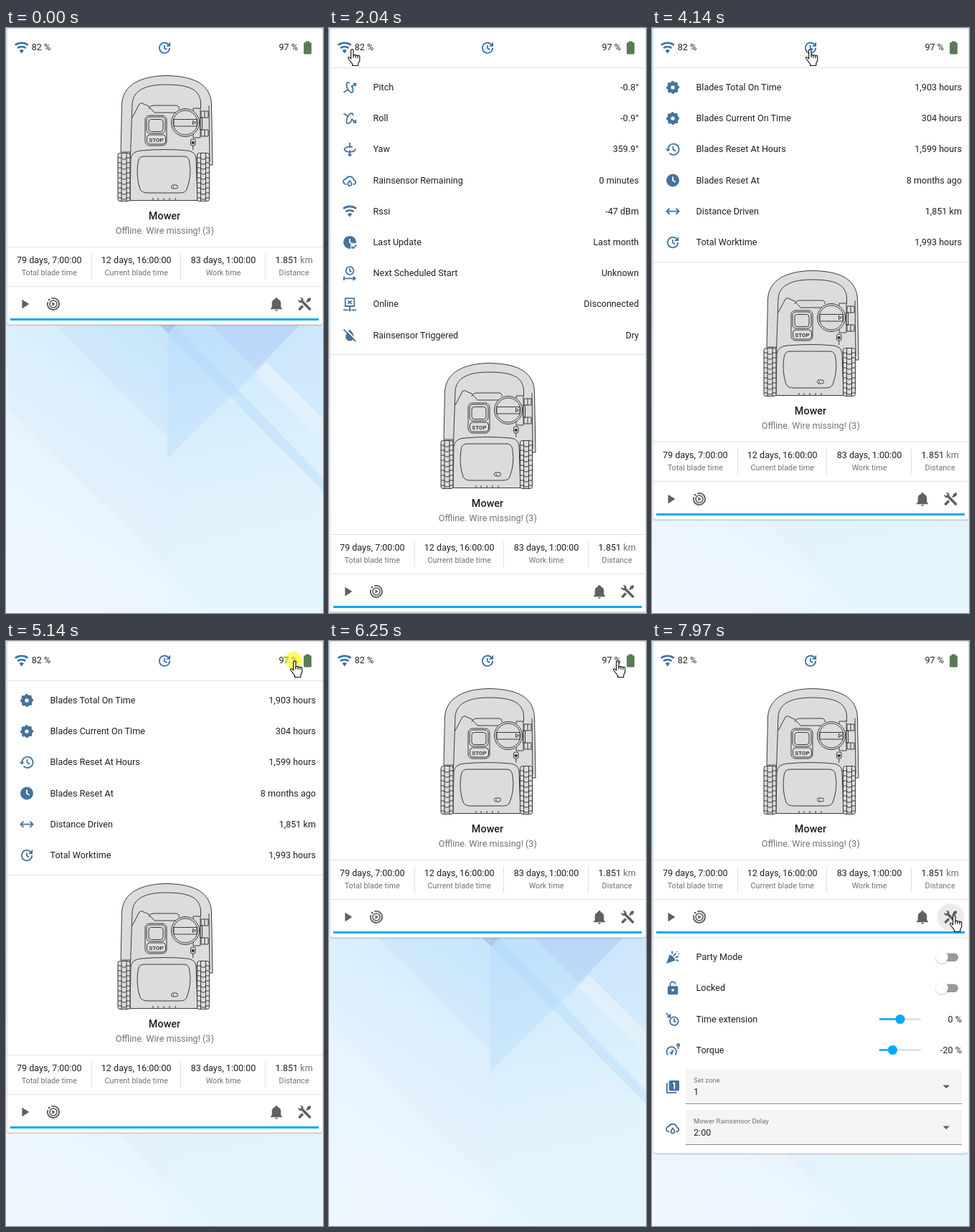
An HTML page that plays this animation: 442x816 px, repeating every 8 s.

```html
<!DOCTYPE html>
<html lang="en">
<head>
<meta charset="utf-8">
<title>Mower card</title>
<style>
html, body { margin: 0; width: 100%; height: 100%; overflow: hidden; background: #e6f3fc; }
svg { display: block; width: 100vw; height: 100vh; }
text { font: 12.6px Roboto, sans-serif; fill: #212121; }
.mid { text-anchor: middle; }
.end { text-anchor: end; }
.name { font-size: 14.4px; font-weight: 500; }
.grey { fill: #727272; }
.label { font-size: 10.8px; fill: #727272; }
.float { font-size: 9.55px; fill: #727272; }
.line { stroke: #e0e0e0; }
.icon { fill: none; stroke: currentColor; stroke-width: 2; }
.icon .f { fill: currentColor; stroke: none; }
.icon .w { stroke: #fff; }
.mower { fill: #dcdcdd; stroke: #3a3a3a; stroke-linejoin: round; }
.mower .n { fill: none; }
.mower text { font-size: 8px; font-weight: 700; fill: #444; stroke: none; text-anchor: middle; }
</style>
</head>
<body>
<svg viewBox="0 0 442 816" id="stage"></svg>
<script>
const LOOP = 8000, ROW = 43.2;
const BLUE = '#44739e', HEAD = '#3a70ac', GREY = '#606060', ACCENT = '#03a9f4';

// Icons on a 24 unit grid; strokes by default, class f for solid parts.
const filled = d => `<path class="f" d="${d}"/>`;
const line = d => `<path d="${d}"/>`;
const cloud = line('M7 18H6a4 4 0 0 1 0-8 6.500 6.500 0 0 1 12.300 1.500 3.300 3.300 0 0 1 .2 6.500H17') +
  line('M12 12.500q2.800 3.500 2.800 5.200a2.800 2.800 0 0 1-5.600 0q0-1.700 2.800-5.200z');
const clock = '<circle class="f" cx="12" cy="12" r="10"/><path class="w" d="M12 6.500V12l4 2.800"/>';
const blade = Array.from({ length: 8 }, (_, i) =>
  `<path class="f" transform="rotate(${i * 45} 12 12)" d="M8 5l3-3.500q3 .5 4.500 4z"/>`).join('') +
  '<circle cx="12" cy="12" r="5.500" stroke-width="5"/>';
const orbit = (tilt, axis) => `<ellipse cx="12" cy="12" rx="4" ry="8.500" transform="rotate(${tilt} 12 12)" stroke-dasharray="34 5"/>` + line(axis);
const icons = {
  wifi: filled('M12 21l3.600-4.800a6 6 0 0 0-7.200 0zM12 3A18 18 0 0 0 1.200 6.600L3 9a15 15 0 0 1 18 0l1.800-2.400A18 18 0 0 0 12 3zM12 9a12 12 0 0 0-7.200 2.400l1.800 2.400a9 9 0 0 1 10.800 0l1.800-2.400A12 12 0 0 0 12 9z'),
  update: line('M20 12.100A8 8 0 1 1 17.600 6.500M11.800 8v4.600l3.900 2.300') + filled('M21 3v7.100h-6.800z'),
  battery: filled('M16.700 4H15V2H9v2H7.300Q6 4 6 5.300v15.400Q6 22 7.300 22h9.400q1.300 0 1.300-1.300V5.300Q18 4 16.700 4z'),
  play: filled('M8 5.100v14l11-7z'),
  motion: line('M8.900 3.500A9 9 0 1 1 3.500 8.900') + '<circle cx="12" cy="12" r="5.600" stroke-width="1.800"/>' +
    filled('M10.300 8.800v6.400l4.500-3.200z') + '<circle class="f" cx="5.500" cy="5.500" r="1.500"/>',
  bell: filled('M21 19v1H3v-1l2-2v-6a7 7 0 0 1 5-6.700V4a2 2 0 0 1 4 0v.3a7 7 0 0 1 5 6.700v6zM14 21a2 2 0 0 1-4 0z'),
  tools: filled('M21.700 20.300l-1.400 1.400a1 1 0 0 1-1.400 0L7 9.850A4 4 0 0 1 2.200 4.700l2.560 2.540 2.480-2.480L4.700 2.200A4 4 0 0 1 9.850 7L21.700 18.900a1 1 0 0 1 0 1.400z') +
    filled('M2.300 18.900a1 1 0 0 0 0 1.400l1.400 1.400a1 1 0 0 0 1.400 0l5.500-5.450-2.840-2.830zM20 2l-4 2v2l-2.170 2.170 2 2L18 8h2l2-4z'),
  pitch: orbit(-25, 'M2.500 19.500L9 15.500M14 11l7-4.500M17.500 6l4 .5-1.500 4'),
  roll: orbit(25, 'M2.500 4.500L9 8.500M14 13l7 5M17 18.500l4.500-.3-1-4'),
  yaw: '<ellipse cx="12" cy="12" rx="8.500" ry="4" stroke-dasharray="34 5"/>' + line('M12 1.500v8M12 13v9M9.500 19.500L12 22l2.500-2.500'),
  cloud,
  clock,
  clockCheck: clock + '<circle cx="18.500" cy="18.500" r="5.500" fill="#fff" stroke="none"/>' + line('M14.500 18.500l2.700 2.700 5-5'),
  clockStart: '<circle cx="12" cy="8" r="6"/>' + line('M12 4.500V8l2.500 2M3 17v6M3 20h17M17 17l3.500 3-3.500 3'),
  offline: line('M5 3h14v12H5zM9 6.500l6 5M15 6.500l-6 5M12 15v5M2 21h7M15 21h7') + '<circle class="f" cx="12" cy="21" r="2"/>',
  waterOff: filled('M12 3q6.500 7 6.500 11.500a6.500 6.500 0 0 1-13 0Q5.500 10 12 3z') +
    '<path class="w" d="M5 2.500L22 19.500"/>' + line('M2.500 3L21 21.500'),
  blade,
  history: line('M4.500 12A8.500 8.500 0 1 1 7 18M12.500 7v5.200l4 2.400') + filled('M.8 11.500h7.400L4.500 15.500z'),
  distance: line('M3 12h18M7 7.500L2.500 12 7 16.500M17 7.500l4.500 4.500-4.500 4.500'),
  heat: line('M10 4.500a2 2 0 0 1 4 0v9a4.300 4.300 0 1 1-4 0z') + '<circle class="f" cx="12" cy="17.500" r="2.300"/>',
  flash: filled('M7 2v11h3v9l7-12h-4l4-8z'),
  party: filled('M2 22l5-14q7 2 9 9z') + line('M13 10l4-4M16 12l5-1M11 7V2.500M17 16l4 2M18 3l1 1M20.500 6.500l1 1'),
  unlock: filled('M6 8.500h12q2 0 2 2V20q0 2-2 2H6q-2 0-2-2v-9.500q0-2 2-2z') +
    line('M8 9V6a4 4 0 0 1 8 0v.5') + '<circle cx="12" cy="15" r="2" fill="#fff" stroke="none"/>',
  clockIn: '<circle cx="14" cy="15" r="6.500"/>' + line('M14 11v4.200l3 1.500M1.500 2.500l6 6M7.800 4v4.800H3'),
  torque: line('M4.500 19.500a7.500 7.500 0 1 1 11 0M10 16l3.500-4M20.500 10V6') +
    '<circle class="f" cx="10" cy="16.500" r="2.200"/><circle cx="20.500" cy="4" r="1.800"/><path d="M6 15h1M10 11.500v1"/>',
  zone: filled('M8 2h12q2 0 2 2v12q0 2-2 2H8q-2 0-2-2V4q0-2 2-2z') + '<path class="w" d="M12 6h2.500v9"/>' + line('M3 6v15h15')
};
const icon = (name, x, y, color = BLUE) =>
  `<g class="icon" color="${color}" transform="translate(${x - 10.8} ${y - 10.8}) scale(.9)">${icons[name]}</g>`;
const text = (s, x, y, cls = '') => `<text x="${x}" y="${y}" class="${cls}">${s}</text>`;
const rule = y => `<path class="line" d="M2 ${y}H441"/>`;
const row = (y, [name, label, value]) =>
  icon(name, 29, y + .5) + text(label, 61.5, y + 4.5) + (value ? text(value, 432, y + 4.5, 'end') : '');

const panels = {
  info: [
    ['pitch', 'Pitch', '-0.8°'], ['roll', 'Roll', '-0.9°'], ['yaw', 'Yaw', '359.9°'],
    ['cloud', 'Rainsensor Remaining', '0 minutes'], ['wifi', 'Rssi', '-47 dBm'],
    ['clockCheck', 'Last Update', 'Last month'], ['clockStart', 'Next Scheduled Start', 'Unknown'],
    ['offline', 'Online', 'Disconnected'], ['waterOff', 'Rainsensor Triggered', 'Dry']],
  blades: [
    ['blade', 'Blades Total On Time', '1,903 hours'], ['blade', 'Blades Current On Time', '304 hours'],
    ['history', 'Blades Reset At Hours', '1,599 hours'], ['clock', 'Blades Reset At', '8 months ago'],
    ['distance', 'Distance Driven', '1,851 km'], ['update', 'Total Worktime', '1,993 hours']],
  battery: [
    ['battery', 'Battery', '97 %'], ['heat', 'Battery Temperature', '18.4 °C'],
    ['flash', 'Battery Voltage', '20.08 V'], ['history', 'Battery Total Charge Cycles', '1,123'],
    ['battery', 'Battery Charging', 'Not charging']]
};
const shiftOf = key => panels[key] ? Math.round(panels[key].length * ROW + 12.6) : 0;
const panelMarkup = key => `<g id="${key}">${rule(55.5)}${
  panels[key].map((r, i) => row(82.4 + i * ROW, r)).join('')}${rule(54.5 + shiftOf(key))}</g>`;

function wheel(x) {
  let treads = '';
  for (let y = 181; y < 240; y += 7) treads += `M${x} ${y}h5l1.500 2h4l1.500-2H${x + 17}`;
  return `<rect x="${x}" y="174.500" width="17" height="67" rx="3"/>
    <path class="n" d="${treads}M${x + 5} 175v66M${x + 12} 175v66"/>`;
}
const mower = `<g class="mower">
  <path d="M160 173L161.500 106C163 78 190 67 223 66.500C262 67 285 78 286.500 106L288 191H284L282 182H173V173z"/>
  <path class="n" d="M173.500 178L176 106C177 87 194 79 223 79C254 79 270 85 271.500 104V112M283 108L284 186"/>
  <path class="n" d="M176 125L186 106Q189 103 192 106L199 109L207 118H241M199 113Q200 108 207 108H236Q242 108 241 113"/>
  <path d="M173 240.500L174 182Q176 172 188 171Q223 168 253 171Q264 172 265 182L267 240.500z"/>
  <path class="n" d="M205 240v-3M212 240v-3M220 240v-3M228 240v-3M236 240v-3"/>
  <path d="M192 179H248Q255 179 256 188Q259 207 252 225Q250 230 243 230H197Q190 230 187 225Q181 207 184 188Q185 179 192 179z"/>
  <rect x="230.500" y="219" width="9" height="5" rx="2.500"/><path d="M233.500 221v1.500"/>
  ${wheel(156)}${wheel(266.5)}
  <path d="M261 112H271V153H261zM272 116h10v9h-10zM272 142h10v9h-10zM273.500 125v17h-3v-17z"/>
  <path class="n" d="M277 116v9M277 142v9"/>
  <circle cx="250" cy="132" r="19.500"/><circle cx="250" cy="132" r="17" class="n"/>
  <path d="M234 127.500H266V137H234z"/><path d="M260.500 129.500v5l4-2.500z"/>
  <rect x="257.500" y="155" width="6.500" height="9" rx="2"/><circle cx="260.700" cy="160" r="1.700" fill="#333"/><path d="M260.700 164v6"/>
  <rect x="194" y="122" width="30" height="42" rx="6"/><rect x="196" y="124" width="26" height="23" rx="5"/>
  <rect x="199" y="127.500" width="20" height="17" rx="3.500"/><rect x="196.500" y="149" width="26" height="13" rx="4"/>
  <text x="209.500" y="158.500">STOP</text></g>`;

const stat = (x, value, label) => text(value, x, 328, 'mid') + text(label, x, 345, 'label mid');
const main = `<g id="main">${mower}
  ${text('Mower', 221, 267, 'name mid')}${text('Offline. Wire missing! (3)', 221.3, 287, 'grey mid')}
  ${rule(305.5)}${rule(360.5)}<path class="line" d="M119.500 315v36M243.500 315v36M361.500 315v36"/>
  ${stat(60.3, '79 days, 7:00:00', 'Total blade time')}${stat(181.7, '12 days, 16:00:00', 'Current blade time')}
  ${stat(303, '83 days, 1:00:00', 'Work time')}${stat(401.6, '1.851 <tspan class="grey">km</tspan>', 'Distance')}
  <circle id="ripple" cx="416.500" cy="385" opacity=".08"/>
  ${icon('play', 26, 385, GREY)}${icon('motion', 66, 385, GREY)}${icon('bell', 377, 385, GREY)}${icon('tools', 416.5, 385, GREY)}
  <path fill="${ACCENT}" d="M6 405h430v3H6z"/></g>`;

const toggle = y => `<rect x="400" y="${y - 5.5}" width="27" height="11.500" rx="5.700" fill="#999"/>
  <circle cx="404" cy="${y + .8}" r="9.200" fill="#000" opacity=".22"/><circle cx="404" cy="${y}" r="8.800" fill="#fff"/>`;
const slider = (y, x) => `<path stroke="#dedede" stroke-width="2.500" d="M317 ${y}h58"/>
  <path stroke="${ACCENT}" stroke-width="2.500" d="M317 ${y}H${x}"/><circle cx="${x}" cy="${y}" r="6.600" fill="${ACCENT}"/>`;
const select = (y, name, label, value) => icon(name, 29, y + 25) +
  `<path fill="#f5f5f5" d="M47 ${y + 49}V${y + 4}q0-4 4-4H428q4 0 4 4V${y + 49}z"/>
  <path stroke="#8c8c8c" d="M47 ${y + 48.5}H432"/><path fill="#6e6358" d="M405.500 ${y + 22.5}h9.500l-4.750 4.700z"/>` +
  text(label, 58, y + 19, 'float') + text(value, 58, y + 36);
const tools = `<g id="tools">${rule(413.5)}
  ${row(440.6, ['party', 'Party Mode'])}${toggle(441)}${row(483.8, ['unlock', 'Locked'])}${toggle(484)}
  ${row(527, ['clockIn', 'Time extension', '0 %'])}${slider(527.5, 346)}
  ${row(570.2, ['torque', 'Torque', '-20 %'])}${slider(570.5, 335.5)}
  ${select(597, 'zone', 'Set zone', '1')}${select(654, 'cloud', 'Mower Rainsensor Delay', '2:00')}</g>`;

const poly = (points, fill, opacity = 1) => `<polygon points="${points}" fill="${fill}" opacity="${opacity}"/>`;
const fade = (id, x1, x2, top, bottom) =>
  `<linearGradient id="${id}" gradientUnits="userSpaceOnUse" x1="${x1}" y1="413" x2="${x2}" y2="760">
  <stop stop-color="${top}"/><stop offset="1" stop-color="${bottom}"/></linearGradient>`;
const backdrop = `<defs>${fade('left', 225, 0, '#c6e5fb', '#ecf4fc')}${fade('right', 225, 300, '#c0e1fb', '#e5f4fb')}</defs>
  <path fill="url(#left)" d="M0 0h225v816H0z"/><path fill="url(#right)" d="M225 0h217v816H225z"/>
  ${poly('0,413 68,413 225,570 225,816 0,816', '#eef7fd', .3)}${poly('0,530 286,816 0,816', '#f2f7fd', .3)}
  ${poly('225,600 347,482 442,577 442,816 225,816', '#e6f6fc', .35)}
  ${poly('411,413 442,413 442,577 347,482', '#d3ebfd', .6)}${poly('225,413 411,413 225,600', '#b9dcf9', .25)}
  ${poly('347,482 363,466 442,545 442,577', '#e4f3fd', .85)}
  ${poly('285,413 411,413 348,477', '#b4c9f4', .4)}${poly('213,413 236,413 442,628 442,646', '#a9d3f8', .35)}
  ${poly('213,413 238,413 226,426', '#a9b4e0', .5)}`;

const arrow = '<path id="arrow" d="M.5 .5v16l3.800-3.500 2.500 5.800 2.600-1.100-2.500-5.700h5.100z"/>';
const hand = `<g id="hand" transform="translate(-5.200 0)">
  <path d="M4.800 2.500a1.700 1.700 0 0 1 3.400 0V9.500q0-1.200 1.500-1.200t1.600 1.400q0-1 1.400-1t1.500 1.500q.2-.9 1.400-.9t1.400 1.600V16.500l-2 4v3H6.800V21L1.300 14q-1.200-2 .5-2.500 1.200 0 3 2.500z"/>
  <path fill="none" d="M8.200 9.500v3M11.300 9.700v3M14.200 10.200v3"/></g>`;

const stage = document.getElementById('stage');
stage.innerHTML = backdrop + `
  <rect id="shadow" x="1" y="1.500" width="440" rx="4" fill="#000" opacity=".12"/>
  <rect id="card" x="1.500" y=".5" width="440" rx="4" fill="#fff" stroke="#dedede"/>
  ${icon('wifi', 21.7, 27.5, HEAD)}${text('82 %', 35.7, 31)}${icon('update', 221, 27.5, HEAD)}
  ${text('97 %', 407, 31, 'end')}${icon('battery', 420.5, 27.5, '#587a55')}
  ${Object.keys(panels).map(panelMarkup).join('')}${main}${tools}
  <circle id="click" r="12" fill="#fff800" opacity=".6"/>
  <g id="cursor" fill="#fff" stroke="#111" stroke-width="1.150" stroke-linejoin="round">${arrow}${hand}</g>`;
const el = Object.fromEntries([...stage.querySelectorAll('[id]')].map(e => [e.id, e]));
const show = (e, on) => e.setAttribute('display', on ? 'inline' : 'none');

const scenes = [[0, ''], [2040, 'info'], [3950, 'blades'], [5350, 'battery'], [6250, ''], [7780, 'tools']];
const clicks = [[1940, 2040], [3750, 3950], [5140, 5350], [6060, 6250], [7580, 7780]];
// start, time between steps, steps, from, to
const moves = [
  [1410, 104, 3, [-10, 5], [31, 29]],
  [2640, 100, 7, [31, 29], [211, 29]],
  [4140, 101, 8, [211, 29], [401, 27]],
  [6450, 101, 8, [401, 27], [421, 367]],
  [7280, 100, 2, [421, 367], [420, 382]]
];
const ease = p => p * p * (3 - 2 * p);

function render(t) {
  const scene = scenes.findLast(s => t >= s[0])[1];
  const shift = shiftOf(scene);
  const height = 413 + shift + (scene === 'tools' ? 301 : 0);
  for (const key of [...Object.keys(panels), 'tools']) show(el[key], key === scene);
  el.card.setAttribute('height', height);
  el.shadow.setAttribute('height', height + 1);
  el.main.setAttribute('transform', `translate(0 ${shift})`);

  const move = moves.findLast(m => t >= m[0]);
  show(el.cursor, move);
  show(el.click, clicks.some(([a, b]) => t >= a && t < b));
  if (move) {
    const [start, gap, steps, from, to] = move;
    const p = ease(Math.min(1, (Math.floor((t - start) / gap) + 1) / steps));
    const [x, y] = from.map((v, i) => Math.round(v + (to[i] - v) * p));
    const pointing = p < .06 || p > .9 || start === 7280;
    el.cursor.setAttribute('transform', `translate(${x} ${y})`);
    el.click.setAttribute('cx', x);
    el.click.setAttribute('cy', y);
    show(el.hand, pointing);
    show(el.arrow, !pointing);
  }
  const spread = Math.floor((t - 7680) / 96);
  el.ripple.setAttribute('r', spread < 0 ? 0 : Math.min(19, 10 + 4 * spread));
}

const begin = performance.now();
function tick() {
  render((performance.now() - begin) % LOOP);
  requestAnimationFrame(tick);
}
tick();
</script>
</body>
</html>
```
